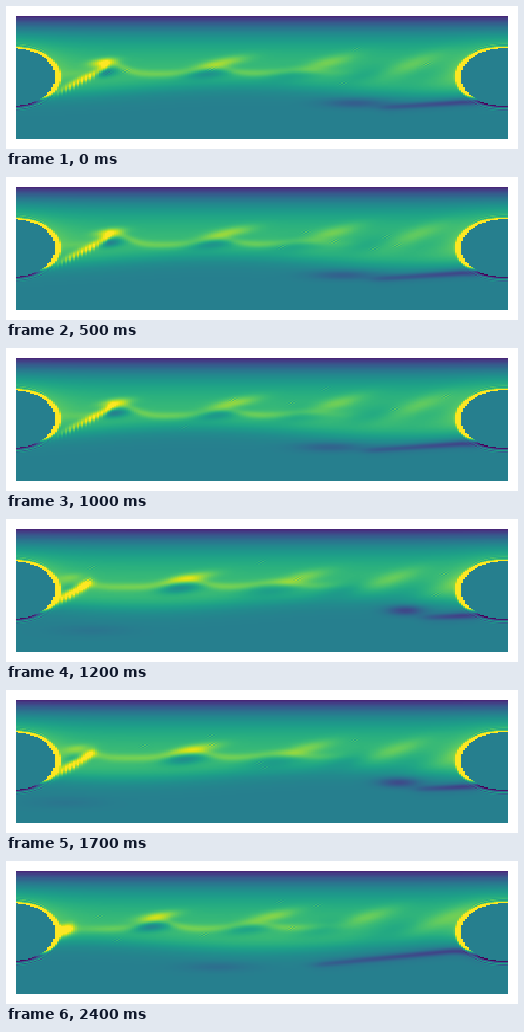
These frames come from a looping animation (512 by 143 pixels, 2.5 s). A matplotlib script:

```python
import numpy as np
import matplotlib.pyplot as plt
from matplotlib.animation import FuncAnimation

W, H, DPI = 512, 143, 100
LEFT, RIGHT, TOP, BOTTOM = 10, 502, 10, 133
NX, NY = 250, 100
FRAMES, STEP_MS = 25, 100
PHASE_STEP = 0.81            # shedding cycles per frame
CX, CY, RX, RY = 498, 71, 43.5, 28.7
STILL = 0.43                 # level of fluid without shear

x = LEFT + (np.arange(NX) + 0.5) * (RIGHT - LEFT) / NX
y = TOP + (np.arange(NY) + 0.5) * (BOTTOM - TOP) / NY
X, Y = np.meshgrid(x, y)
COL, ROW = np.meshgrid(np.arange(NX), np.arange(NY))


def sigmoid(t):
    return 1 / (1 + np.exp(-np.clip(t, -40, 40)))


def lump(x0, y0, rx, ry, slope=0.0):
    """Tilted Gaussian spot."""
    dx = X - x0
    return np.exp(-(dx / rx) ** 2 - ((Y - y0 - slope * dx) / ry) ** 2)


def strand(line, start, end, width, fade=5):
    """Soft band around a height line, fading out at both ends."""
    ends = sigmoid((x - start) / fade) * sigmoid((end - x) / fade)
    return ends * np.exp(-((Y - line) / width) ** 2)


# Cylinder wrapped across the periodic side walls
PERIOD = RIGHT - LEFT
U = ((X - CX + PERIOD / 2) % PERIOD - PERIOD / 2) / RX
V = (Y - CY) / RY
R = np.hypot(U, V)
SIDE = np.abs(U) / np.maximum(R, 1e-6)


def shell(thickness):
    return np.exp(-np.clip((R - 1) / thickness, 0, 9) ** 4)


RIM = (0.8 * shell(0.035 + 0.08 * SIDE) * np.clip((0.8 - V) * 4, 0, 1)
       - 0.4 * shell(0.06) * np.clip((V - 0.78) * 8, 0, 1))
HALO = 0.11 * np.exp(-np.clip(R - 1, 0, 9) / 0.35) * np.clip(0.7 - V, 0, 1)
WALL = 0.09 + 0.63 * (1 - np.exp(-(Y - TOP) / 19))


def shear(phase):
    """Layer growing from the top wall, with a wave on its lower edge."""
    edge = 83 + 5 * np.cos(2 * np.pi * ((x - 440) / 420 + phase))
    return STILL + (WALL - STILL) * sigmoid((edge - Y) / 5) + HALO


def upper_wake(phase):
    out = np.zeros_like(X)
    crest = np.full(NX, 68.0)
    for n in range(-1, 5):
        age = phase + n
        if age < -0.4:
            continue
        a = max(age, 0)
        xc = 97 + 112 * age - 8 * age ** 2
        yc = 65 - 2.5 * np.sin(2 * np.pi * age) + 0.7 * a
        born = np.clip((age + 0.4) / 0.35, 0, 1) * np.clip((450 - xc) / 40, 0, 1)
        long = 14 + 18 * (1 - np.exp(-a))
        thick = 4 + 1.2 * a
        tilt = -0.12 - 0.07 * a
        out += born * 0.27 * np.exp(-a / 3) * lump(xc + 15 * a, yc - 9, long, thick, tilt)
        out -= born * 0.27 * np.exp(-a / 2.5) * lump(xc, yc + 1, long * 0.9, thick + 0.8, tilt / 2)
        crest -= born * 11 * np.exp(-a / 2) * np.exp(-((x - xc - 6) / (20 + 5 * a)) ** 2)
    return out + 0.11 * strand(crest, 75, 320, 4, 15)


def attached_layer(phase):
    """Bright sheet growing off the left body, then pinching off."""
    a = (phase - 0.4) % 1
    x0, xe = 42, 64 + 62 * a
    y0, ye = 92 - 21 * (1 - a) ** 4, 68 - 13 * a
    along = np.clip((x - x0) / (xe - x0), 0, 1)
    line = y0 + (ye - y0) * along
    sheet = strand(line, x0, xe, 5.5 - 2.5 * a, 2.5) * along ** (1.2 * a)
    teeth = strand(line + 2, 55, xe - 12, 3.5, 3) * np.where(COL % 2, 1, -1)
    return (1 - a ** 4) * (0.5 * sheet + 0.1 * teeth)


def lower_wake(phase):
    out = np.zeros_like(X)
    for age in (phase - 1, phase):
        born = np.clip((age + 0.5) / 0.15, 0, 1)
        xc = 350 - 230 * age - 190 * age ** 2
        amp = 0.15 * born * np.exp(-1.7 * age)
        rx = 15 + 21 * sigmoid(12 * (age + 0.15))
        out -= amp * lump(xc, 97 + 20 * age, rx, 5)

    # Dark sheet drawn out from under the right body
    c = (phase - 0.5) % 1
    xe, xm = 450 - 150 * c, 455
    ye, ym = 104 - 9 * (1 - c) ** 2, 97 - 10 * c ** 4
    t = np.clip((x - xe) / (xm - xe), 0, 1)
    line = ye + (ym - ye) * t + (96 - ym) * np.clip((x - 440) / 36, 0, 1) ** 2
    sheet = 0.15 * strand(line, xe, 476, 2.8) + 0.07 * strand(line, xe, 476, 6)
    return out - sheet * (0.6 + 0.6 * t)


def ripples(i):
    """Numerical ringing near the body and small specks in the stream."""
    rng = np.random.default_rng(40 + i)
    wave = np.cos((R - 1.15) * 90) * np.exp(-((R - 1.13) / 0.06) ** 2)
    below, above = np.clip((V - 0.6) * 4, 0, 1), np.clip((-V - 0.7) * 4, 0, 1)
    out = rng.uniform(0.3, 0.9) * wave * (0.1 * above - 0.2 * below)
    checker = np.where((COL + ROW) % 2, 1, -1)
    for _ in range(6):
        out += 0.08 * checker * lump(rng.uniform(80, 450), rng.uniform(38, 80), 4, 1.8, -0.2)
    return out


def field(i):
    phase = (PHASE_STEP * i) % 1
    flow = (shear(phase) + upper_wake(phase) + attached_layer(phase)
            + lower_wake(phase) + ripples(i) + RIM)
    return np.clip(np.where(R < 1, STILL, flow), 0, 1)


fig = plt.figure(figsize=(W / DPI, H / DPI), dpi=DPI, facecolor="white")
ax = fig.add_axes([LEFT / W, 1 - BOTTOM / H, (RIGHT - LEFT) / W, (BOTTOM - TOP) / H])
ax.axis("off")
image = ax.imshow(field(0), cmap="viridis", vmin=0, vmax=1, aspect="auto",
                  interpolation="nearest", extent=(LEFT, RIGHT, BOTTOM, TOP))


def update(i):
    image.set_data(field(i))
    return (image,)


anim = FuncAnimation(fig, update, frames=FRAMES, interval=STEP_MS,
                     repeat=True, repeat_delay=0, blit=False)
plt.show()
```
